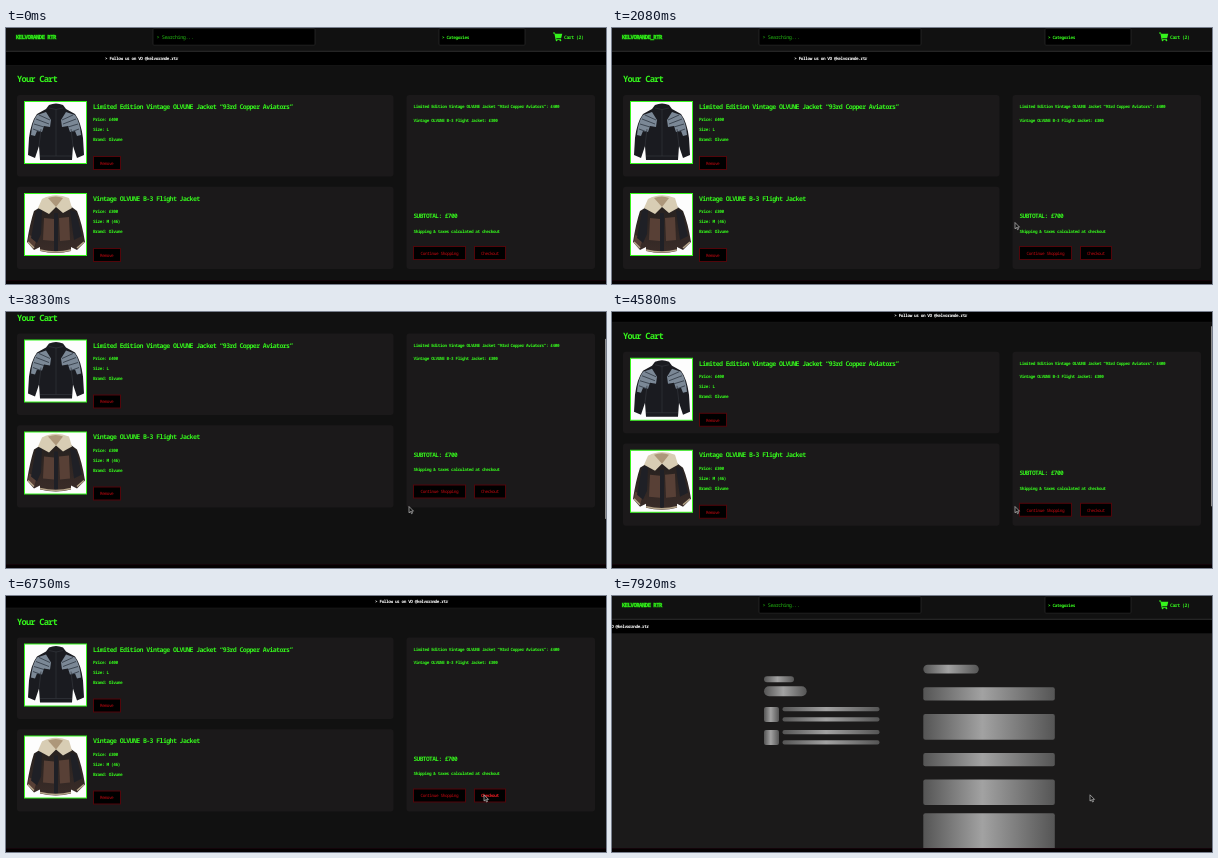
An HTML page that plays this animation: 600 by 256 pixels, repeating every 8000 ms.

```html
<!DOCTYPE html>
<html lang="en">
<head>
<meta charset="utf-8">
<title>Cart</title>
<style>
  html, body { margin: 0; width: 100%; height: 100%; overflow: hidden; background: #000; }
  svg { display: block; width: 100%; height: 100%; }
  text {
    font-family: "Noto Sans Mono", "DejaVu Sans Mono", monospace;
    font-weight: 600; letter-spacing: -.09em; fill: #35f51c;
    white-space: pre; text-rendering: geometricPrecision;
  }
  .logo { font-weight: 700; stroke: #18b808; stroke-width: .9; stroke-opacity: .55; paint-order: stroke; }
  .search { font-weight: 500; fill: #22b512; }
  .ticker { font-weight: 700; fill: #fff; }
  .action { font-weight: 500; fill: #c40810; }
  .button { fill: #000; stroke: #52050a; }
  .hover .action { font-weight: 600; fill: #f01c22; }
  .card { fill: #1b191a; }
  .field { fill: #000; stroke: #2b2b2b; stroke-width: .7; }
  .photo { fill: #fdfdfd; stroke: #35f51c; }
</style>
</head>
<body>
<svg viewBox="0 0 600 256" preserveAspectRatio="none">
  <defs>
    <linearGradient id="shimmer">
      <stop offset="0" stop-color="#555"/>
      <stop offset=".45" stop-color="#a2a2a2"/>
      <stop offset="1" stop-color="#555"/>
    </linearGradient>
    <linearGradient id="leather" x2="0" y2="1">
      <stop offset="0" stop-color="#26211f"/>
      <stop offset="1" stop-color="#3a2c28"/>
    </linearGradient>
    <clipPath id="view"><rect width="600" height="252"/></clipPath>
  </defs>
  <rect width="600" height="256" fill="#111"/>

  <g clip-path="url(#view)">
    <g id="page">
      <g id="header">
        <rect width="600" height="23" fill="#111"/>
        <rect y="23" width="600" height="14.5" fill="#000"/>
        <path d="M0 23.3H600" stroke="#3a3a3a" stroke-width=".8"/>
        <path d="M0 37.5H600" stroke="#1d1d1d" stroke-width=".6"/>
        <rect class="field" x="147" y=".6" width="162" height="16.6" rx="1"/>
        <rect class="field" x="433" y=".6" width="86" height="16.6" rx="1"/>
        <g fill="#35f51c">
          <path d="M547 4.6h1.9l.4 1.2h7l-1.1 4.2h-5l.2.8h4.6v.9h-5.4l-1.2-6.2H547z"/>
          <circle cx="550.6" cy="12.3" r=".9"/><circle cx="554.4" cy="12.3" r=".9"/>
        </g>
      </g>

      <g id="cart">
        <rect class="card" x="11" y="67" width="376.5" height="81.5" rx="3"/>
        <rect class="card" x="11" y="158.7" width="376.5" height="82.3" rx="3"/>
        <rect class="card" x="400.5" y="67" width="188.5" height="174" rx="3"/>

        <rect class="photo" x="18.5" y="73.5" width="62" height="62"/>
        <g transform="translate(18 73)">
          <path fill="#1a1b20" d="M25 4q7-3 14 0l3 4 9 5q6 8 8 24l1 17-7 3-4-12-1 14H16l-1-14-4 12-7-3 1-17q2-16 8-24l9-5z"/>
          <path fill="#7b8896" d="M13 14l9-3 5 8-1 7-6-1-2 6-5-1-2 5-4-1q1-13 6-20zM51 14l-9-3-5 8 1 7 6-1 2 6 5-1 2 5 4-1q-1-13-6-20z"/>
          <path fill="none" stroke="#363f4a" stroke-width=".9" d="M12 18l13 5M10 23l10 3M9 28l8 3M15 14l11 5M52 18l-13 5M54 23l-10 3M55 28l-8 3M49 14l-11 5"/>
          <path fill="none" stroke="#33353b" stroke-width=".7" d="M25 7q7 3 14 0M32 8v47M16 55h32M17 28l-2 17M47 28l2 17"/>
        </g>

        <rect class="photo" x="18.5" y="165.5" width="62" height="62"/>
        <g transform="translate(18 165)">
          <path fill="url(#leather)" d="M18 13l27-1 8 6q5 12 8 31l-8 8-6-3v4q-15 4-31 0v-4l-6 3-7-8q3-19 7-31z"/>
          <path fill="#584036" d="M20 25l10 1v22l-11-1zM35 25l10-1 1 23-10 1zM5 42l8 3-3 10-6-6z"/>
          <path fill="#1f2026" d="M12 18l6-3-1 26-4 9-6-5zM46 17l6 2 6 24-8 4zM30 20h4v38h-4z"/>
          <path fill="#d8cdb4" d="M18 6q13-7 27-1l3 10-9 5-7-6-7 7-11-6z"/>
          <path fill="#ad977a" d="M24 5q8-3 15 0l-7 9z"/>
          <path fill="none" stroke="#b5a489" stroke-width="1.6" d="M16 57q16 4 31 0M4 49l6 6M60 49l-7 6"/>
        </g>
        <g id="labels"></g>
      </g>

      <g id="loading">
        <rect y="37.5" width="600" height="215" fill="#000"/>
        <g id="skeleton"><rect y="37.5" width="600" height="215" fill="#1b1a1a"/></g>
      </g>
    </g>
    <rect id="thumb" x="599" width="1" height="180" fill="#8d8d8d"/>
  </g>

  <rect y="252" width="600" height="4" fill="#050102"/>
  <path d="M0 252.5H600" stroke="#14040a"/>
  <path id="cursor" d="M0 0V6.3L1.5 5L2.5 7.2L3.5 6.7L2.6 4.6H4.5Z" fill="#111" stroke="#ddd" stroke-width=".6"/>
</svg>

<script>
const $ = id => document.getElementById(id);
const header = $('header'), labels = $('labels'), skeleton = $('skeleton');

function add(parent, tag, attrs, content = '') {
  const el = document.createElementNS('http://www.w3.org/2000/svg', tag);
  for (const key in attrs) el.setAttribute(key, attrs[key]);
  el.textContent = content;
  return parent.appendChild(el);
}

// Monospaced text sized by the advance of one character (.6em less the tracking).
const write = (parent, x, y, advance, content, cls = '') =>
  add(parent, 'text', { x, y, class: cls, 'font-size': advance / .51 }, content);

function button(x, y, width, textX, content) {
  const group = add(labels, 'g', {});
  add(group, 'rect', { class: 'button', x, y, width, height: 13 });
  write(group, textX, y + 8.4, 2.23, content, 'action');
  return group;
}

function product(y, name, price, size) {
  write(labels, 87, y, 3.34, name);
  [`Price: ${price}`, `Size: ${size}`, 'Brand: Olvune'].forEach((line, i) =>
    write(labels, 87, y + 12.4 + i * 10, 2.25, line));
  button(87.5, Math.round(y + 47) + .5, 27, 94, 'Remove');
}

const bomber = 'Limited Edition Vintage OLVUNE Jacket “93rd Copper Aviators”';
const flight = 'Vintage OLVUNE B-3 Flight Jacket';

const logo = write(header, 10, 11.3, 2.86, '', 'logo');
write(header, 150.5, 10.8, 2.64, '> Searching...', 'search');
write(header, 436, 10.8, 2.25, '> Categories');
write(header, 558, 10.8, 2.42, 'Cart (2)');
const ticker = write(header, 0, 32, 2.21, '> Follow us on VO @kelvorande.rtr', 'ticker');

write(labels, 11, 54.2, 4.45, 'Your Cart');
product(81, bomber, '£400', 'L');
product(172.7, flight, '£300', 'M (46)');
write(labels, 407.5, 80, 2.21, bomber + ': £400');
write(labels, 407.5, 93.7, 2.21, flight + ': £300');
write(labels, 407.5, 190.3, 3.12, 'SUBTOTAL: £700');
write(labels, 407.5, 204.8, 2.21, 'Shipping & taxes calculated at checkout');
button(407.5, 218.5, 52, 414.5, 'Continue Shopping');
const checkout = button(468.5, 218.5, 31, 475, 'Checkout');

const bar = (x, y, width, height, rx) =>
  add(skeleton, 'rect', { x, y, width, height, rx, fill: 'url(#shimmer)' });
bar(152, 80.3, 30, 6, 3);
bar(152, 90.3, 42.7, 10, 5);
for (const y of [111, 134]) {
  bar(152, y, 15, 15, 2);
  bar(170.5, y, 97, 4.3, 2);
  bar(170.5, y + 10.3, 97, 4.3, 2);
}
bar(311.3, 68.7, 55.5, 8.8, 4.4);
for (const [y, height] of [[91.3, 13.3], [118, 25.7], [157, 13.3], [183.4, 25.7], [217.3, 40]])
  bar(311.3, y, 131.5, height, 2);

const LOOP = 8000, NAVIGATE = 7000, SPEED = .04;
const ramp = (t, from, to) => {
  const p = Math.min(1, Math.max(0, (t - from) / (to - from)));
  return p * p * (3 - 2 * p);
};

function draw(t) {
  const loading = t >= NAVIGATE;
  const scroll = loading ? 0 :
    11.5 * ramp(t, 2700, 2980) + 34 * ramp(t, 3430, 3800) - 20 * ramp(t, 4270, 4650);
  $('page').setAttribute('transform', `translate(0 ${-scroll})`);

  const blink = t % 1000;
  logo.textContent = 'KELVORANDE' + (blink >= 50 && blink < 550 ? '_' : ' ') + 'RTR';
  ticker.setAttribute('x', loading ? -73 + SPEED * (t - NAVIGATE) : 99 + SPEED * t);

  $('cart').style.display = loading ? 'none' : '';
  $('loading').style.display = loading ? '' : 'none';
  skeleton.setAttribute('opacity', ramp(t, 7470, 7800));

  $('thumb').setAttribute('y', scroll * .69 - 4.5);
  $('thumb').setAttribute('opacity', ramp(t, 2700, 2780) * (1 - ramp(t, 4800, 5000)));

  const enter = ramp(t, 1650, 2050), toCheckout = ramp(t, 4650, 4980);
  const x = 572 - 169 * enter + 75 * toCheckout;
  const y = 10 + 184.5 * enter + 4.3 * toCheckout;
  $('cursor').setAttribute('transform', `translate(${x} ${y})`);
  $('cursor').style.display = t < 1650 ? 'none' : '';
  checkout.setAttribute('class', t > 4900 ? 'hover' : '');
}

const start = performance.now();
function frame() {
  draw((performance.now() - start) % LOOP);
  requestAnimationFrame(frame);
}
frame();
</script>
</body>
</html>
```
